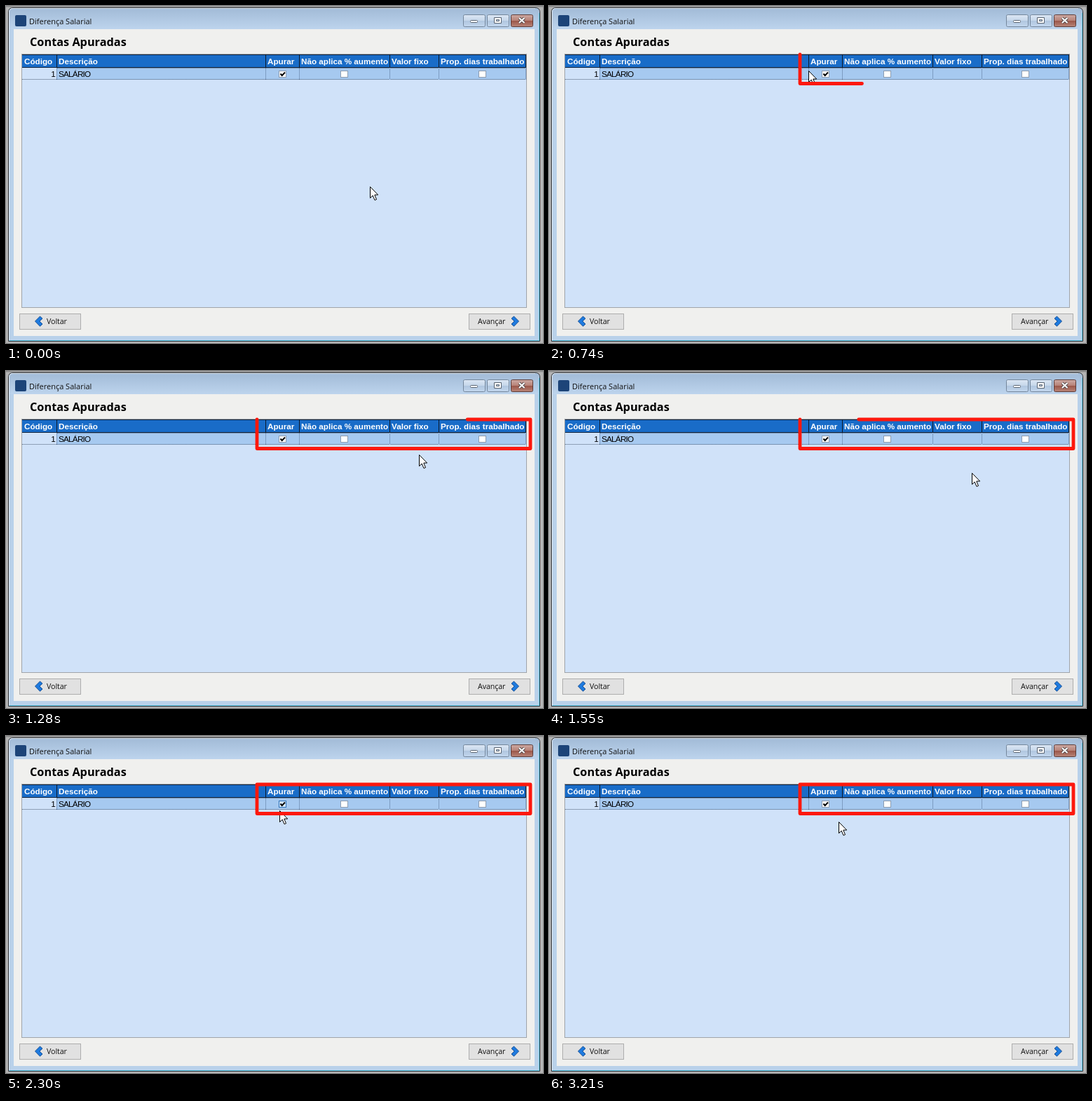
An HTML page that plays this animation: 766 px wide and 480 px high, repeating every 3280 ms.

```html
<!DOCTYPE html>
<html lang="pt-BR">
<head>
<meta charset="utf-8">
<title>Diferença Salarial</title>
<style>
  html, body { margin: 0; width: 100%; height: 100%; overflow: hidden; background: #b4b4b4; }
  svg { display: block; width: 766px; height: 480px; }
  text { white-space: pre; }
  .ui { font: 11px "Open Sans", "Noto Sans", sans-serif; fill: #111; }
  .btn { font-size: 10.7px; letter-spacing: -.1px; }
  .heading { font: bold 16.3px "Open Sans", "Noto Sans", sans-serif; fill: #000; }
  .head { font: bold 11.7px "Liberation Sans", Arial, sans-serif; fill: #fff; }
  .cell { font: 11.7px "Liberation Sans", Arial, sans-serif; letter-spacing: -.75px; fill: #000; }
</style>
</head>
<body>
<svg viewBox="0 0 766 480">
  <defs>
    <linearGradient id="bar" x2="0" y2="1">
      <stop stop-color="#a2bbd7"/><stop offset="1" stop-color="#bdd4ed"/>
    </linearGradient>
    <linearGradient id="glass" x2="0" y2="1">
      <stop stop-color="#dce7f4"/><stop offset=".48" stop-color="#c6d7ea"/>
      <stop offset=".5" stop-color="#b0c6df"/><stop offset="1" stop-color="#c3d7ee"/>
    </linearGradient>
    <linearGradient id="close" x2="0" y2="1">
      <stop stop-color="#cdaaa4"/><stop offset=".48" stop-color="#b88378"/>
      <stop offset=".5" stop-color="#9a5548"/><stop offset="1" stop-color="#b98578"/>
    </linearGradient>
  </defs>

  <!-- window frame -->
  <rect width="766" height="480" fill="#b4b4b4"/>
  <rect width="766" height="1.5" fill="#8d8d8d"/>
  <path d="M3.5 477.5V9Q3.5 2.5 10 2.5H755Q761.500 2.500 761.500 9V477.500Z" fill="#b9d1ea" stroke="#2b2f35"/>
  <path d="M4.500 33V9Q4.500 3.500 10 3.500H755Q760.500 3.500 760.500 9V33Z" fill="url(#bar)"/>
  <path d="M4.500 476V9Q4.500 3.500 10 3.500H755" fill="none" stroke="#e3edf7"/>
  <path d="M760.500 10V476.500H5" fill="none" stroke="#62cbe8"/>
  <rect x="11" y="33" width="743" height="437" fill="#f0f0ee"/>
  <rect x="13" y="13" width="16" height="16" rx="2" fill="#1d4478"/>
  <text class="ui" x="33" y="26">Diferença Salarial</text>

  <!-- caption buttons -->
  <g stroke="#74869b">
    <rect x="652.500" y="12.500" width="31" height="17" rx="2" fill="url(#glass)"/>
    <rect x="686.500" y="12.500" width="31" height="17" rx="2" fill="url(#glass)"/>
    <rect x="720.500" y="12.500" width="31" height="17" rx="2" fill="url(#close)" stroke="#5d3d3a"/>
  </g>
  <g fill="#fff" stroke="#5a6572">
    <rect x="662.500" y="20.500" width="10" height="3" rx="1"/>
    <path d="M696.500 16.500H706.500V24.500H696.500ZM699.500 19.500V21.500H703.500V19.500Z" fill-rule="evenodd"/>
  </g>
  <path d="M732 17L739.500 24M739.500 17L732 24" stroke="#4f4547" stroke-width="4"/>
  <path d="M732 17L739.500 24M739.500 17L732 24" stroke="#fff" stroke-width="2.200"/>

  <text class="heading" x="34" y="57">Contas Apuradas</text>

  <!-- table -->
  <rect x="22.500" y="68.500" width="720" height="361" fill="#d0e2f9" stroke="#a0a4aa"/>
  <rect x="23" y="69" width="719" height="18" fill="#196cc8"/>
  <rect x="23" y="88" width="719" height="17" fill="#a6c9f0"/>
  <rect x="23" y="88" width="49" height="17" fill="#d0e2f9"/>
  <path d="M23 69.500H742M23 87.500H742" stroke="#12233a"/>
  <path d="M73 88.500H741.500V104.500H23" fill="none" stroke="#4c5d74" stroke-dasharray="1 1"/>
  <g id="table"></g>

  <!-- navigation -->
  <g fill="#e1e1e1" stroke="#adadad">
    <rect x="19.500" y="438.500" width="87" height="22"/>
    <rect x="660.500" y="438.500" width="87" height="22"/>
  </g>
  <g fill="#1e7be0" stroke="#174f94" stroke-linejoin="round">
    <path d="M48.500 442L52 445.200L47.800 449L52 453L48.500 456.200L41.500 449Z"/>
    <path d="M724.500 442L721 445.200L725.200 449L721 453L724.500 456.200L731.500 449Z"/>
  </g>
  <text class="ui btn" x="58" y="453">Voltar</text>
  <text class="ui btn" x="673" y="453">Avançar</text>

  <path id="arrow" d="M.5 .5V16.500L4.200 13L7 19.500L9.500 18.500L6.800 12H11.700Z" fill="#fff" stroke="#000"/>
  <path id="mark" d="M358 69V110.500H748V69Z" fill="none" stroke="#fd180d" stroke-width="4.800"
        stroke-linecap="round" stroke-linejoin="round"/>
</svg>
<script>
const $ = id => document.getElementById(id);

// left edge, right edge, title
const columns = [
  [23, 72, 'Código'], [72, 370, 'Descrição'], [370, 418, 'Apurar'],
  [418, 547, 'Não aplica % aumento'], [547, 617, 'Valor fixo'], [617, 741, 'Prop. dias trabalhado']
];
const box = (x, id = '') =>
  `<rect id="${id}" x="${x}.5" y="92.5" width="10" height="9" fill="#fff" stroke="#8c9cb0"/>`;

$('table').innerHTML = columns.map(([left, right, title], i) => `
  <clipPath id="c${i}"><rect x="${left}" y="69" width="${right - left - 1}" height="18"/></clipPath>
  <text class="head" x="${left + 3}" y="83" clip-path="url(#c${i})">${title}</text>
  <path d="M${right + .5} 69V88" stroke="#0c1828"/>
  <path d="M${right + .5} 88V105" stroke="#7d9cc2"/>`).join('') +
  '<text class="cell" x="70" y="101" text-anchor="end">1</text>' +
  '<text class="cell" x="75" y="101">SALÁRIO</text>' +
  box(389, 'apply') + box(477) + box(674) +
  '<path d="M391.5 96.500L393.700 99L398 94.500" fill="none" stroke="#000" stroke-width="2"/>';

const LOOP = 3280, FIRST = 460, STEPS = 41;
const oddGaps = { 10: 60, 11: 60, 14: 60, 18: 60, 23: 60, 32: 60, 34: 80 };
const starts = [FIRST];
for (let i = 0; i < STEPS - 1; i++) starts.push(starts[i] + (oddGaps[i] ?? 70));

// step, x, y of the pointer tip
const path = [
  [-1, 519, 257], [0, 508, 246], [2, 425, 147], [4, 370, 92], [7, 386, 95],
  [9, 450, 104], [12, 589, 119], [15, 620, 136], [17, 574, 153], [20, 493, 159],
  [23, 414, 127], [27, 390, 106], [32, 403, 93], [36, 411, 107], [39, 413, 120], [40, 413, 122]
];

const slope = (i, axis) => {
  if (i < 1 || i > path.length - 2) return 0;
  const a = path[i - 1], b = path[i + 1];
  return (b[axis] - a[axis]) / (b[0] - a[0]);
};

// cubic Hermite through the path points
function along(step, axis) {
  let i = 0;
  while (i < path.length - 2 && step > path[i + 1][0]) i++;
  const a = path[i], b = path[i + 1], span = b[0] - a[0];
  const u = (step - a[0]) / span, v = 1 - u;
  return v * v * (1 + 2 * u) * a[axis] + u * u * (3 - 2 * u) * b[axis] +
    span * u * v * (v * slope(i, axis) - u * slope(i + 1, axis));
}

const markLength = $('mark').getTotalLength();

function draw(time) {
  const step = starts.filter(s => s <= time).length - 1;
  $('arrow').setAttribute('transform', `translate(${Math.round(along(step, 1))} ${Math.round(along(step, 2))})`);

  const drawn = Math.min(markLength, Math.max(0, 130 + (step - 4) * 54.1));
  $('mark').style.visibility = drawn ? 'visible' : 'hidden';
  $('mark').style.strokeDasharray = drawn < markLength ? `${drawn} 2000` : 'none';

  const hover = step >= 26 && step <= 34;
  $('apply').setAttribute('fill', hover ? '#d3e7fb' : '#fff');
  $('apply').setAttribute('stroke', hover ? '#2f72b8' : '#8c9cb0');
}

const begin = performance.now();
function tick() {
  draw((performance.now() - begin) % LOOP);
  requestAnimationFrame(tick);
}
tick();
</script>
</body>
</html>
```
